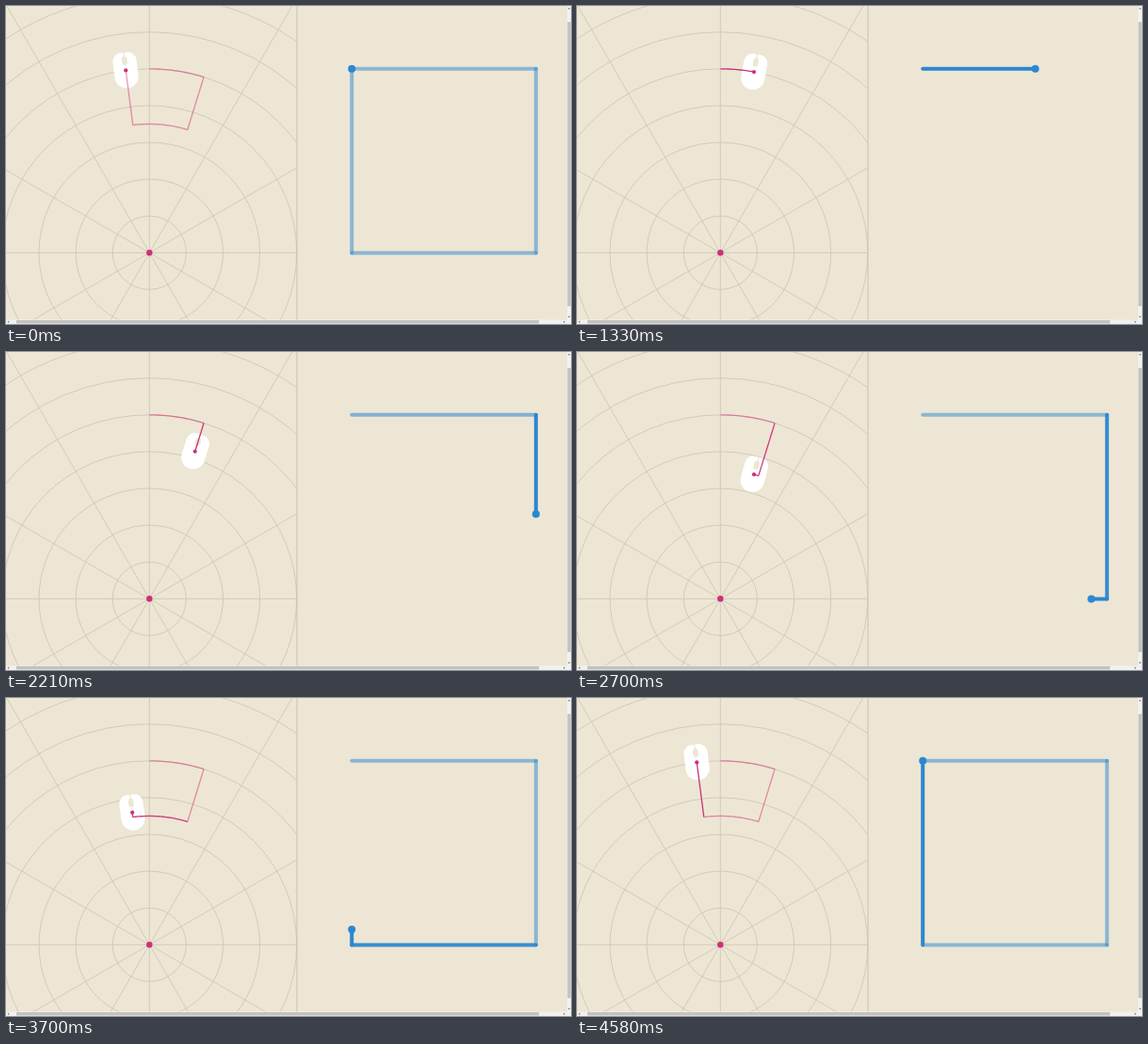
Animation, 600 px wide and 338 px high, one loop 4610 ms. Source, as an HTML page with a canvas:

```html
<!DOCTYPE html>
<html lang="en">
<head>
<meta charset="utf-8">
<title>Polar and Cartesian square</title>
<style>
html, body { margin: 0; width: 100%; height: 100%; overflow: hidden; background: #ede6d4; }
canvas { display: block; }
</style>
</head>
<body>
<canvas id="stage" width="600" height="338"></canvas>
<script>
const ctx = document.getElementById('stage').getContext('2d');
const LOOP = 4610, FADE = 600;
const PAPER = '#ede6d4', GRID = '#cbc5b3', PINK = '#ce2f78', BLUE = '#2b87d1';
const CENTER = [152.3, 262.3], RING = 39.1;

// Corners of the walk: [angle from north, radius in rings] and [x, y].
const TURN = 0.3 - 1.5 / 3.5;
const POLAR = [[0, 5], [0.3, 5], [0.3, 3.5], [TURN, 3.5], [TURN, 5]];
const SQUARE = [[367.2, 66.7], [562.8, 66.7], [562.8, 262.4], [367.2, 262.4], [367.2, 66.7]];

// [time in ms, sides walked]
const PACE = [[580, 0], [970, 0.251], [1090, 0.345], [1640, 0.952], [1730, 1.066], [2180, 1.505],
  [2700, 2.084], [3270, 2.648], [3700, 3.083], [4360, 3.79], [4580, 4]];

const clamp = v => Math.max(0, Math.min(1, v));
const mix = (a, b, f) => a.map((v, i) => v + (b[i] - v) * f);

function lookup(t, from, to) {
  if (t <= PACE[0][from]) return PACE[0][to];
  for (let i = 1; i < PACE.length; i++) {
    const a = PACE[i - 1], b = PACE[i];
    if (t <= b[from]) return a[to] + (b[to] - a[to]) * (t - a[from]) / (b[from] - a[from]);
  }
  return PACE[PACE.length - 1][to];
}
const walked = t => lookup(t, 0, 1);
const timeAt = p => lookup(p, 1, 0);

function along(corners, p) {
  const i = Math.min(3, Math.floor(p));
  return mix(corners[i], corners[i + 1], p - i);
}

const toXY = ([angle, r]) =>
  [CENTER[0] + r * RING * Math.sin(angle), CENTER[1] - r * RING * Math.cos(angle)];

function disc([x, y], r, color) {
  ctx.fillStyle = color;
  ctx.beginPath();
  ctx.arc(x, y, r, 0, 7);
  ctx.fill();
}

function polyline(points, color, width, cap = 'butt') {
  ctx.strokeStyle = color;
  ctx.lineWidth = width;
  ctx.lineCap = cap;
  ctx.beginPath();
  points.forEach(p => ctx.lineTo(...p));
  ctx.stroke();
}

function box(color, x, y, w, h) {
  ctx.fillStyle = color;
  ctx.fillRect(x, y, w, h);
}

function drawGrid() {
  ctx.save();
  ctx.beginPath();
  ctx.rect(0, 0, 309, 334);
  ctx.clip();
  for (let a = 0; a < 6; a++) {
    polyline([toXY([a * Math.PI / 6, -10]), toXY([a * Math.PI / 6, 10])], GRID, 0.8);
  }
  for (let k = 1; k <= 7; k++) {
    ctx.beginPath();
    ctx.arc(...CENTER, k * RING, 0, 7);
    ctx.stroke();
  }
  ctx.restore();
  polyline([[309, 0], [309, 334]], '#c8c2b1', 1);
  disc(CENTER, 3.2, PINK);
}

function drawMouse([x, y], angle) {
  ctx.save();
  ctx.translate(x, y);
  ctx.rotate(angle);
  ctx.fillStyle = '#fff';
  ctx.beginPath();
  ctx.roundRect(-12.6, -19, 25.2, 38, [9, 9, 12.6, 12.6]);
  ctx.fill();
  box(PAPER, -0.6, -19.5, 1.2, 6);
  ctx.fillStyle = PAPER;
  ctx.beginPath();
  ctx.ellipse(0, -10.3, 2.9, 4.8, 0, 0, 7);
  ctx.fill();
  ctx.restore();
}

function arrow(x, y, angle) {
  ctx.save();
  ctx.translate(x, y);
  ctx.rotate(angle);
  ctx.fillStyle = '#606060';
  ctx.beginPath();
  ctx.moveTo(0, -0.8);
  ctx.lineTo(1.3, 0.7);
  ctx.lineTo(-1.3, 0.7);
  ctx.fill();
  ctx.restore();
}

function drawScrollbars() {
  box('#f1f1f1', 596, 0, 4, 338);
  box('#f1f1f1', 0, 333.5, 600, 4.5);
  box('#c1c1c1', 596.3, 17, 3.4, 302);
  box('#c1c1c1', 11, 334, 555, 3.5);
  arrow(598, 2.5, 0);
  arrow(598, 330.5, Math.PI);
  arrow(2.5, 335.8, -Math.PI / 2);
  arrow(593, 335.8, Math.PI / 2);
}

function draw(t) {
  const resting = t < PACE[0][0];
  const reset = clamp((t - 60) / 330);
  const p = resting ? 4 : walked(t);
  const polar = resting ? mix(POLAR[4], POLAR[0], reset) : along(POLAR, p);
  const spot = toXY(polar);

  box(PAPER, 0, 0, 600, 338);
  drawGrid();
  drawMouse(spot, polar[0]);

  for (let side = 0; side < 4 && side < p; side++) {
    const length = Math.min(1, p - side);
    ctx.globalAlpha = resting ? 0.5 * (1 - reset)
      : length < 1 ? 1 : 1 - 0.5 * clamp((t - timeAt(side + 1)) / FADE);
    const trail = Array.from({ length: 21 }, (_, i) => toXY(along(POLAR, side + length * i / 20)));
    polyline(trail, PINK, 1.3);
    polyline([SQUARE[side], along(SQUARE, side + length)], BLUE, 4, 'round');
  }
  ctx.globalAlpha = 1;

  disc(spot, 2.1, PINK);
  disc(along(SQUARE, p), 4, BLUE);
  drawScrollbars();
}

const start = performance.now();
function tick() {
  draw((performance.now() - start) % LOOP);
  requestAnimationFrame(tick);
}
tick();
</script>
</body>
</html>
```
